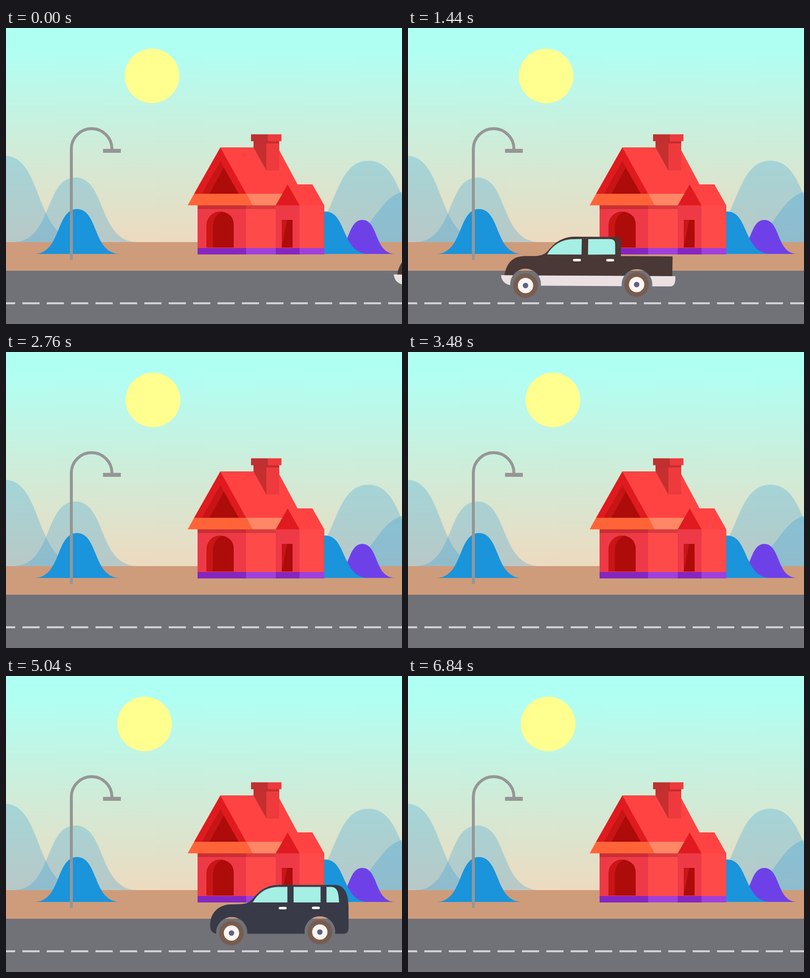
Animation of 800x600 px, one loop 6.96 s. Source, as an HTML page:

```html
<!DOCTYPE html>
<html lang="en">
<head>
<meta charset="utf-8">
<title>Street</title>
<style>
html, body { margin: 0; width: 100%; height: 100%; overflow: hidden; }
svg { display: block; width: 100vw; height: 100vh; }
</style>
</head>
<body>
<svg viewBox="0 0 800 600">
  <defs>
    <linearGradient id="sky" gradientUnits="userSpaceOnUse" x1="0" y1="45" x2="0" y2="434">
      <stop stop-color="#b0fff3"/><stop offset="1" stop-color="#eddabf"/>
    </linearGradient>
    <mask id="truckArches">
      <path fill="#fff" d="M400 400H820V560H400Z"/>
      <circle cx="486" cy="521" r="31"/><circle cx="711" cy="518" r="31"/>
    </mask>
    <mask id="suvArches">
      <path fill="#fff" d="M400 400H720V560H400Z"/>
      <circle cx="456" cy="520" r="31.5"/><circle cx="634" cy="518" r="31"/>
    </mask>
    <g id="wheel">
      <circle r="25" fill="#775c50"/><circle r="15.5" fill="#fdf5f0"/><circle r="5.5" fill="#5a6289"/>
    </g>
  </defs>

  <path fill="url(#sky)" d="M0 0H800V434H0Z"/>
  <circle id="sun" r="55.3" fill="#ffff90"/>
  <g id="farHills" fill="#1a94db" fill-opacity=".25"></g>
  <path fill="#ce9c7b" d="M0 434H800V492H0Z"/>
  <path fill="#717178" d="M0 492H800V600H0Z"/>
  <path stroke="#d1d1d5" stroke-width="4" stroke-dasharray="34.7 14.57" d="M-16.2 558H800"/>
  <g id="nearHills"></g>

  <g fill="none" stroke="#969696">
    <path stroke-width="6" d="M132 470V245A41 41 0 0 1 214 245"/>
    <path stroke-width="8" d="M196 249H232"/>
  </g>

  <g id="house">
    <path fill="#ff4343" d="M433 242H549L589 317L612 359H485Z"/>
    <path fill="#e01a1e" d="M433 242L380 336H485Z"/>
    <path fill="#c51515" d="M433 270L396 336H470Z"/>
    <path fill="#ae0b0b" d="M440 283L411 336H470Z"/>
    <path fill="#c52f2f" d="M500 229H526V289L500 242Z"/>
    <path fill="#ee3a3c" d="M526 229H552V289H526Z"/>
    <path fill="#c42d31" d="M500 229H552V234H500Z"/>
    <path fill="#c03030" d="M495 215.500H529V229.500H495Z"/>
    <path fill="#ee3a3c" d="M529 215.500H556.500V229.500H529Z"/>
    <path fill="#ee3a47" d="M387 359H485V446H387ZM545 359H593V446H545Z"/>
    <path fill="#ff4a4a" d="M485 359H545V446H485ZM593 359H643V446H593Z"/>
    <path fill="#c92e33" d="M387 359H485V367H387Z"/>
    <path fill="#d93a3e" d="M485 359H545V367H485Z"/>
    <path fill="#ff6438" d="M380 336H486L498 359.500H367Z"/>
    <path fill="#ff8765" d="M486 336H559L545 359.500H498Z"/>
    <path fill="#ff4343" d="M569 317H619L643 359.500H593Z"/>
    <path fill="#e01a1e" d="M569 317L545 359.500H593Z"/>
    <path fill="#8626c0" d="M387 446H485V459H387ZM545 446H593V459H545Z"/>
    <path fill="#a040dc" d="M485 446H545V459H485ZM593 446H643V459H593Z"/>
    <path fill="#c81616" d="M405 445V399.500A27.500 27.500 0 0 1 460 399.500V445ZM557 389H568V445H557Z"/>
    <path fill="#ae0b0b" d="M418 445V401Q419 380 437 372.500Q460 377 460 399.500V445ZM568 389H579V445H557Z"/>
  </g>

  <g id="truck">
    <g id="truckBody">
      <g mask="url(#truckArches)">
        <path fill="#ebe1e3" d="M436 504L788 499.500Q790 520 779 521L457 524.500Q438 522 436 504Z"/>
        <path fill="#493836" d="M443 504C447 478 460 465 484 464.500L506 464C518 463 524 460 530 453C546 433 562 423.500 586 423.500L668 422.500Q677 423 677.500 432V461L782 460V500Z"/>
      </g>
      <path fill="#a5efe5" d="M528.500 460.500C540 440 559 428.500 582 428.500L598 428V459.500ZM611 428L655 427Q665 427 665.500 436L666 458L611 459.500Z"/>
      <path stroke="#fff" stroke-width="5" stroke-linecap="round" d="M583.500 471L594.500 470.800M650.500 470L661.500 469.800"/>
    </g>
    <use href="#wheel" x="485.500" y="522"/><use href="#wheel" x="710" y="520"/>
  </g>

  <g id="suv">
    <path mask="url(#suvArches)" fill="#393a47" d="M412.500 508C411 482 428 464 453 463L472 462.500C486 462 492 459 499 451C514 432 530 423.500 552 423.500H664C683 424 691 438 692 466V512Q692 522 682 522.500H425Q413 520 412.500 508Z"/>
    <path fill="#a5efe5" d="M498.500 459C510 439 526 427.500 552 427.500H568.500V459ZM581 427.500H635.500V459H581ZM647.500 427.500H657C670 428 672 440 673 459H647.500Z"/>
    <path stroke="#fff" stroke-width="5" stroke-linecap="round" d="M553.500 470.500H564.500M620.500 470H631.500"/>
    <use href="#wheel" x="455.500" y="521"/><use href="#wheel" x="634" y="519"/>
  </g>
</svg>
<script>
const LOOP = 6960, STEP = 120;
const get = id => document.getElementById(id);

// Bell-shaped hill around cx, reaching half a width w to each side.
function hill(parent, cx, top, base, w, fill) {
  const path = document.createElementNS('http://www.w3.org/2000/svg', 'path');
  path.setAttribute('d', `M${cx - w} ${base}
    C${cx - .36 * w} ${base} ${cx - .5 * w} ${top} ${cx} ${top}
    C${cx + .5 * w} ${top} ${cx + .36 * w} ${base} ${cx + w} ${base}Z`);
  if (fill) path.setAttribute('fill', fill);
  get(parent).append(path);
}
hill('farHills', -3, 259, 434, 160);
hill('farHills', 140, 303, 434, 126);
hill('farHills', 732, 269, 434, 163);
hill('farHills', 828, 328, 434, 185);
hill('nearHills', 143.5, 367, 458, 87, '#1a94db');
hill('nearHills', 720, 389, 458, 66, '#6e41e8');
hill('nearHills', 645, 372, 458, 88, '#1a94db');

// The sun drifts to and fro: [time, x]
const drift = [[0, 295], [840, 296.5], [2040, 261.3], [2760, 297],
  [4200, 288.5], [5040, 280], [6840, 283], [LOOP, 295]];

function sunX(t) {
  const i = drift.findIndex(([time]) => time > t);
  const [t0, x0] = drift[i - 1], [t1, x1] = drift[i];
  const p = (t - t0) / (t1 - t0);
  return x0 + (x1 - x0) * p * p * (3 - 2 * p);
}

function draw(now) {
  const t = Math.floor(now % LOOP / STEP) * STEP;
  const x = sunX(t);
  get('sun').setAttribute('cx', x);
  get('sun').setAttribute('cy', 97 + Math.max(0, 285 - x) / 24);

  const rock = .75 * (1 + Math.cos(2 * Math.PI * t / 1800));
  get('truck').setAttribute('transform', `translate(${(840 - t) * .4135})`);
  get('truckBody').setAttribute('transform', `rotate(${rock} 612 500)`);
  get('suv').setAttribute('transform', `translate(${(5040 - t) * .452})`);
}

const start = performance.now();
function tick() {
  draw(performance.now() - start);
  requestAnimationFrame(tick);
}
tick();
</script>
</body>
</html>
```
